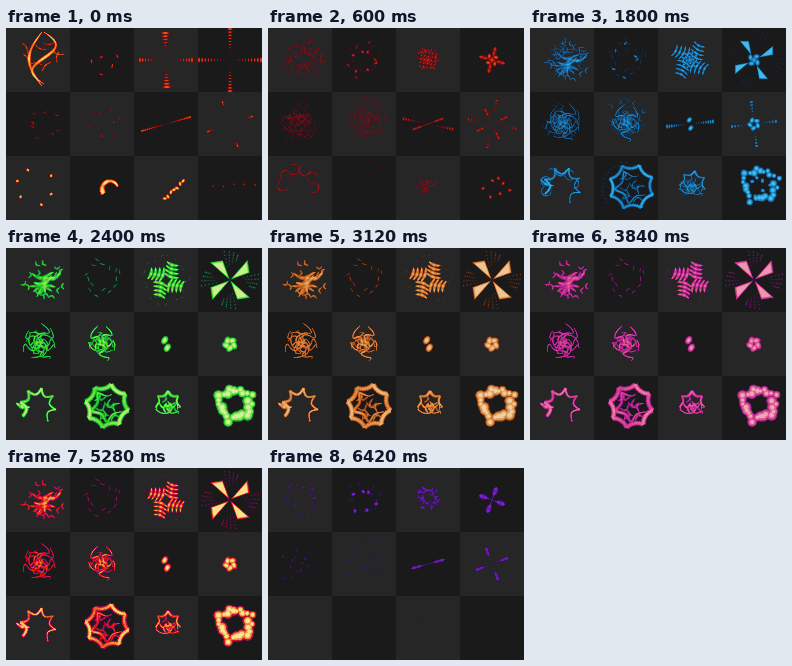
Write an HTML page with a canvas that moves like this. It is 256 px wide and 192 px high and loops after 6.48 s.

```html
<!DOCTYPE html>
<html lang="en">
<head>
<meta charset="utf-8">
<title>Particle effects</title>
<style>
html, body { margin: 0; width: 100%; height: 100%; overflow: hidden; background: #1a1a1a; }
canvas { display: block; width: 256px; height: 192px; }
</style>
</head>
<body>
<canvas id="stage" width="256" height="192"></canvas>
<script>
const W = 256, H = 192, CELL = 64, PI = Math.PI, TAU = PI * 2;
const STEP = 60, PHASES = 12;
const { sin, cos, abs, min, max, floor, sqrt } = Math;
const out = document.getElementById('stage').getContext('2d');
const heatCanvas = document.createElement('canvas');
heatCanvas.width = W;
heatCanvas.height = H;
const heat = heatCanvas.getContext('2d', { willReadFrequently: true });
const image = out.createImageData(W, H);

// Hue of the cool edge, hue of the hot core, saturation.
const ramps = [
  [335, 410, 0.85], [245, 300, 0.85], [215, 190, 0.75],
  [172, 82, 0.72], [12, 34, 0.68], [285, 345, 0.65],
  [255, 390, 0.55], [290, 408, 0.85], [262, 282, 0.75]
];

function hotColor([cool, hot, sat], v) {
  const hue = cool + (hot - cool) * min(1, v * 1.15), light = 0.13 + 0.66 * v;
  const a = sat * min(light, 1 - light);
  return [0, 8, 4].map(n => {
    const k = (n + hue / 30) % 12;
    return 255 * (light - a * max(-1, min(k - 3, 9 - k, 1)));
  });
}

let weight = 1; // strength of the pose being drawn
const layers = [[1, 0.35], [0.75, 0.7], [0.42, 1]];
const rnd = (i, seed) => { const x = sin(i * 127.1 + seed * 311.7) * 43758.5453; return x - floor(x); };
const size = w => w * sqrt(weight);
const tone = v => {
  const n = Math.round(255 * min(1, v * sqrt(weight)));
  return `rgb(${n},${n},${n})`;
};
const polar = (r, a) => [r * cos(a), r * sin(a)];
const taper = w => s => w * (0.25 + 0.75 * sin(PI * s));
const thin = w => s => w * (1 - 0.7 * s);

function around(n, from, to, draw) {
  for (let i = 0; i < n; i++) draw(from + (to - from) * i / n, i);
}

function blob(x, y, rx, ry, v, angle = 0) {
  for (const [k, b] of layers) {
    heat.fillStyle = tone(v * b);
    heat.beginPath();
    heat.ellipse(x, y, size(rx) * k, size(ry) * k, angle, 0, TAU);
    heat.fill();
  }
}

function tube(path, width, v, n = 24) {
  for (const [k, b] of layers) {
    for (let i = 0; i < n; i++) {
      const s = i / n;
      heat.strokeStyle = tone(v * b * (0.86 + 0.14 * sin(s * 17)));
      heat.lineWidth = max(0.3, size(width(s + 0.5 / n)) * k);
      heat.beginPath();
      heat.moveTo(...path(s));
      heat.lineTo(...path(s + 1 / n));
      heat.stroke();
    }
  }
}

// Streak centred on x, y that waves sideways.
function streak(x, y, dir, len, width, v, amp = 0, freq = PI) {
  const c = cos(dir), d = sin(dir);
  tube(s => {
    const f = (s - 0.5) * len, b = amp * sin(freq * s);
    return [x + c * f - d * b, y + d * f + c * b];
  }, width, v, len < 8 ? 7 : 20);
}

// Short bent streaks scattered in a ring.
function crumbs(n, r0, r1, len, w, v, seed, bend = 0.4) {
  around(n, 0, TAU, (a, i) => {
    const t = a + rnd(i, seed) * TAU / n;
    const [x, y] = polar(r0 + (r1 - r0) * rnd(i + 50, seed), t);
    const dir = t + PI / 2 + (rnd(i + 90, seed) - 0.5) * 2.4;
    streak(x, y, dir, len, taper(w), v * (0.7 + 0.3 * rnd(i + 20, seed)), bend * len);
  });
}

function tentacles(n, reach, w, v, seed, curl = 0.5, from = 0, to = TAU) {
  around(n, from, to, (a, i) => {
    const end = reach * (0.45 + 0.55 * rnd(i, seed)), phase = rnd(i + 30, seed) * TAU;
    tube(s => polar(1 + end * s, a + curl * s + 0.4 * sin(s * 9 + phase)), thin(w), v);
  });
}

// Ring, or part of one, whose radius ripples.
function snake(r, ripple, waves, from, to, width, v) {
  tube(s => {
    const a = from + (to - from) * s;
    return polar(r + ripple * sin(waves * a), a + 0.12 * cos(waves * a));
  }, width, v, 90);
}

// Beads along straight arms, growing or shrinking outwards.
function arms(n, angle, r0, r1, count, w0, w1, v, thick = 0.5) {
  around(n, angle, angle + TAU, a => {
    for (let i = 0; i < count; i++) {
      const s = i / (count - 1), w = w0 + (w1 - w0) * s;
      blob(...polar(r0 + (r1 - r0) * s, a), w * thick, w, v * (0.7 + 0.3 * s), a);
    }
  });
}

function petals(n, angle, r0, r1, w, v) {
  around(n, angle, angle + TAU, a =>
    tube(s => polar(r0 + (r1 - r0) * s, a), s => w * sin(PI * s * s), v));
}

// Pinwheel of triangular vanes.
function vanes(n, angle, r, spread, v) {
  around(n, angle, angle + TAU, a => {
    const corners = [[0, 0], polar(r, a), polar(r * 0.78, a + spread)];
    const mid = [0, 1].map(k => corners.reduce((sum, p) => sum + p[k], 0) / 3);
    for (const [k, b] of layers) {
      heat.fillStyle = tone(v * b);
      heat.beginPath();
      corners.forEach(p => heat.lineTo(...p.map((q, j) => mid[j] + (q - mid[j]) * size(0.5 + k / 2))));
      heat.fill();
    }
  });
}

// Tight swirl of overlapping lobes.
function whirl(n, angle, r, v) {
  around(n, angle, angle + TAU, a => {
    blob(...polar(r * 0.5, a), r * 0.6, r * 0.42, v, a + 0.9);
  });
}

function stars(n, r0, r1, w, v, seed) {
  around(n, 0, TAU, (a, i) => {
    const [x, y] = polar(r0 + (r1 - r0) * rnd(i, seed), a + 0.5 * rnd(i + 9, seed));
    blob(x, y, w * 1.5, w * 0.8, v, a);
    blob(x, y, w * 0.8, w * 1.4, v, a + 0.5);
  });
}

// Row of sparks along a slanted line.
function sparks(n, dir, len, w, v) {
  for (let i = 0; i < n; i++) {
    const [x, y] = polar(len * (i / (n - 1) - 0.5), dir);
    blob(x, y + sin(i * 2), w * 1.6, w, v, i * 0.9);
  }
}

// Four poses per effect, drawn around the cell centre at the phases in KEYS.
const KEYS = [0, 4, 8, 11];
const shift = (x, y) => heat.translate(x, y);
const effects = [
  [
    () => {
      tube(s => [4 - 13 * sin(PI * s), -28 + 54 * s], taper(4), 0.85);
      tube(s => [6 + 12 * sin(TAU * s), -28 + 52 * s], taper(4), 0.85);
      shift(4, -4);
      crumbs(8, 9, 19, 13, 2.4, 0.7, 2, 0.15);
    },
    () => {
      shift(6, 1);
      crumbs(9, 2, 13, 19, 5, 0.9, 6, 0.25);
      crumbs(15, 10, 22, 6, 2.6, 0.7, 3);
    },
    () => { shift(5, -2); crumbs(26, 6, 20, 8, 2, 0.72, 5, 0.5); },
    () => { shift(3, -2); crumbs(24, 8, 20, 2.4, 2, 0.5, 7, 0); }
  ], [
    () => { shift(1, 4); crumbs(5, 5, 17, 4, 2.2, 0.65, 12, 0); },
    () => { shift(1, -2); crumbs(15, 10, 20, 5, 1.2, 0.5, 12, 0.1); },
    () => { crumbs(6, 9, 19, 4, 4, 0.9, 8, 0); crumbs(9, 8, 16, 5, 1, 0.4, 4); },
    () => { stars(6, 8, 16, 1.8, 0.55, 3); crumbs(14, 8, 19, 3, 1.5, 0.45, 4, 0); }
  ], [
    () => { arms(2, 0, 9, 26, 7, 1, 3.4, 0.58, 0.35); arms(2, -1.6, 11, 27, 6, 2, 5, 0.58, 0.32); },
    () => {
      around(4, 0.1, 0.1 + TAU, a => {
        for (let i = 0; i < 4; i++) {
          const [x, y] = polar(5 + i * 4, a);
          streak(x - 5 * sin(a), y + 5 * cos(a), a + 1.8, 15 - i, taper(4), 0.9, 1.5);
        }
      });
      crumbs(20, 19, 26, 3, 0.8, 0.4, 7, 0);
    },
    () => {
      blob(0, 0, 9, 9, 0.55);
      for (let i = 0; i < 25; i++) blob(i % 5 * 3.5 - 7, floor(i / 5) * 3.5 - 7, 1.8, 1.8, 0.9);
    },
    () => { shift(0, -2); crumbs(30, 5, 12, 4, 2.6, 0.56, 9); }
  ], [
    () => arms(4, 0, 3, 31, 10, 0.8, 3.4, 0.58, 0.35),
    () => {
      vanes(4, -0.85, 27, 0.5, 0.95);
      for (let j = 0; j < 4; j++) arms(4, -0.2 + j * 0.17, 14 + j * 2, 29 - j, 5, 0.9, 0.9, 0.36, 1);
    },
    () => { whirl(4, PI / 4, 9, 0.9); blob(0, 0, 6, 6, 0.75); },
    () => petals(4, -1.22, 0, 14, 7, 0.6)
  ], [
    () => { shift(6, 0); crumbs(8, 11, 17, 4, 1.6, 0.5, 5); },
    () => { shift(1, 0); tentacles(16, 20, 2.4, 0.72, 3); },
    () => { shift(-1, -2); tentacles(13, 20, 2.2, 0.5, 6, 1); crumbs(12, 7, 18, 6, 2, 0.75, 8, 0.5); },
    () => { shift(-5, 1); crumbs(13, 5, 17, 3, 1.8, 0.42, 2, 0.2); }
  ], [
    () => { shift(2, -3); crumbs(9, 8, 17, 3, 1.6, 0.5, 11); },
    () => { shift(0, -1); tentacles(13, 14, 2.2, 0.68, 8); tentacles(5, 25, 3, 0.85, 4, 0.3); },
    () => { shift(2, -4); tentacles(13, 24, 2, 0.5, 5, 0.9); crumbs(14, 9, 23, 6, 1.9, 0.72, 4, 0.5); },
    () => { shift(1, -4); crumbs(25, 6, 23, 2.5, 1.8, 0.4, 6, 0.1); }
  ], [
    () => arms(2, -0.28, 2, 25, 13, 0.6, 1.4, 0.55, 1.2),
    () => whirl(2, -1.9, 8, 0.95),
    () => arms(2, 0.05, 2, 24, 10, 0.6, 4, 0.76, 0.5),
    () => petals(2, -0.27, 0, 18, 4, 0.56)
  ], [
    () => arms(4, -1.9, 18, 23, 3, 0.7, 1.5, 0.5, 1.5),
    () => whirl(5, -1, 8, 0.95),
    () => arms(4, -1.53, 4, 23, 7, 0.5, 3.5, 0.76, 0.5),
    () => petals(4, -1.93, 4, 18, 4.5, 0.55)
  ], [
    () => { shift(-3, -1); stars(6, 17, 21, 1.5, 0.85, 4); },
    () => {
      shift(0, -2);
      snake(15, 3.4, 8, 2.5, 7.4, thin(4.4), 0.92);
      streak(-15, -1, 0.3, 14, taper(5.5), 0.95, 2);
    },
    () => {
      shift(-2, -3);
      around(6, 2.9, 7, (a, i) => {
        const [x, y] = polar(15, a);
        tube(s => [x + 5 * cos(i * 2 + s * 4.6), y + 5 * sin(i * 2 + s * 4.6)], taper(2.4), 0.75);
      });
    },
    () => blob(-20, -12, 0.7, 0.7, 0.12)
  ], [
    () => { shift(8, 1); tube(s => polar(8, PI * (0.8 + 1.1 * s)), s => 6.5 - 3.5 * s, 1); },
    () => {
      shift(5, -2);
      snake(20, 2.4, 8, 0, TAU, () => 5.4, 0.9);
      snake(13, 3, 5, 0.4, 5, taper(4), 0.78);
      crumbs(9, 3, 17, 10, 3, 0.75, 9, 0.5);
    },
    () => {
      around(24, PI * 0.85, PI * 2.15, (a, i) => blob(...polar(23 + 4 * rnd(i, 3), a), 2, 1, 0.38, a + i));
      crumbs(9, 8, 18, 4, 1.1, 0.3, 5, 0.5);
    },
    () => {}
  ], [
    () => { shift(8, 2); sparks(7, -0.75, 25, 1.8, 0.85); },
    () => {
      shift(2, -4);
      snake(11, 2, 7, 2.8, 6.8, taper(3.6), 0.88);
      tentacles(5, 19, 3.2, 0.85, 4, 0.2, 0.2, 3.4);
      crumbs(4, 3, 8, 8, 3, 0.85, 5);
    },
    () => { shift(-3, -3); crumbs(9, 4, 10, 9, 2.4, 0.75, 6, 0.5); },
    () => { shift(-8, -6); crumbs(5, 2, 6, 1.5, 1, 0.16, 4, 0); }
  ], [
    () => { shift(4, -3); sparks(5, -0.05, 42, 0.9, 0.45); },
    () => {
      shift(5, -4);
      around(26, 0, TAU, (a, i) => {
        const w = 3.2 + 3 * rnd(i, 8);
        blob(...polar(12 + 8 * rnd(i, 5), a), w, w, 1);
      });
    },
    () => { shift(4, -3); stars(7, 6, 18, 2.8, 0.8, 5); },
    () => blob(14, -8, 0.7, 0.7, 0.1)
  ]
];

function drawEffect(poses, index, phase) {
  const x = index % 4 * CELL, y = floor(index / 4) * CELL;
  poses.forEach((pose, k) => {
    const d = phase - KEYS[k], gap = k === 3 || (k === 2 && d > 0) ? 3 : 4;
    weight = 1 - abs(d) / gap;
    if (weight <= 0) return;
    heat.save();
    heat.beginPath();
    heat.rect(x, y, CELL, CELL);
    heat.clip();
    heat.translate(x + CELL / 2, y + CELL / 2);
    heat.rotate(d * 0.08);
    heat.scale(1 + d * 0.02, 1 + d * 0.02);
    pose();
    heat.restore();
  });
}

function colorize(ramp) {
  const src = heat.getImageData(0, 0, W, H).data, dst = image.data;
  const lut = Array.from({ length: 256 }, (_, i) => hotColor(ramp, i / 255));
  for (let i = 0; i < src.length; i += 4) {
    const p = i / 4, light = (floor(p % W / CELL) + floor(p / W / CELL)) % 2 === 0;
    const base = light ? 38 : 26, alpha = min(1, src[i] / 80);
    for (let c = 0; c < 3; c++) dst[i + c] = base + (lut[src[i]][c] - base) * alpha;
    dst[i + 3] = 255;
  }
  out.putImageData(image, 0, 0);
}

function draw(step) {
  heat.globalCompositeOperation = 'source-over';
  heat.fillStyle = '#000';
  heat.fillRect(0, 0, W, H);
  heat.globalCompositeOperation = 'lighten';
  effects.forEach((poses, i) => drawEffect(poses, i, step % PHASES));
  colorize(ramps[floor(step / PHASES)]);
}

const start = performance.now();
let shown = -1;
function tick() {
  const step = floor((performance.now() - start) / STEP) % (PHASES * ramps.length);
  if (step !== shown) draw(shown = step);
  requestAnimationFrame(tick);
}
tick();
</script>
</body>
</html>
```
